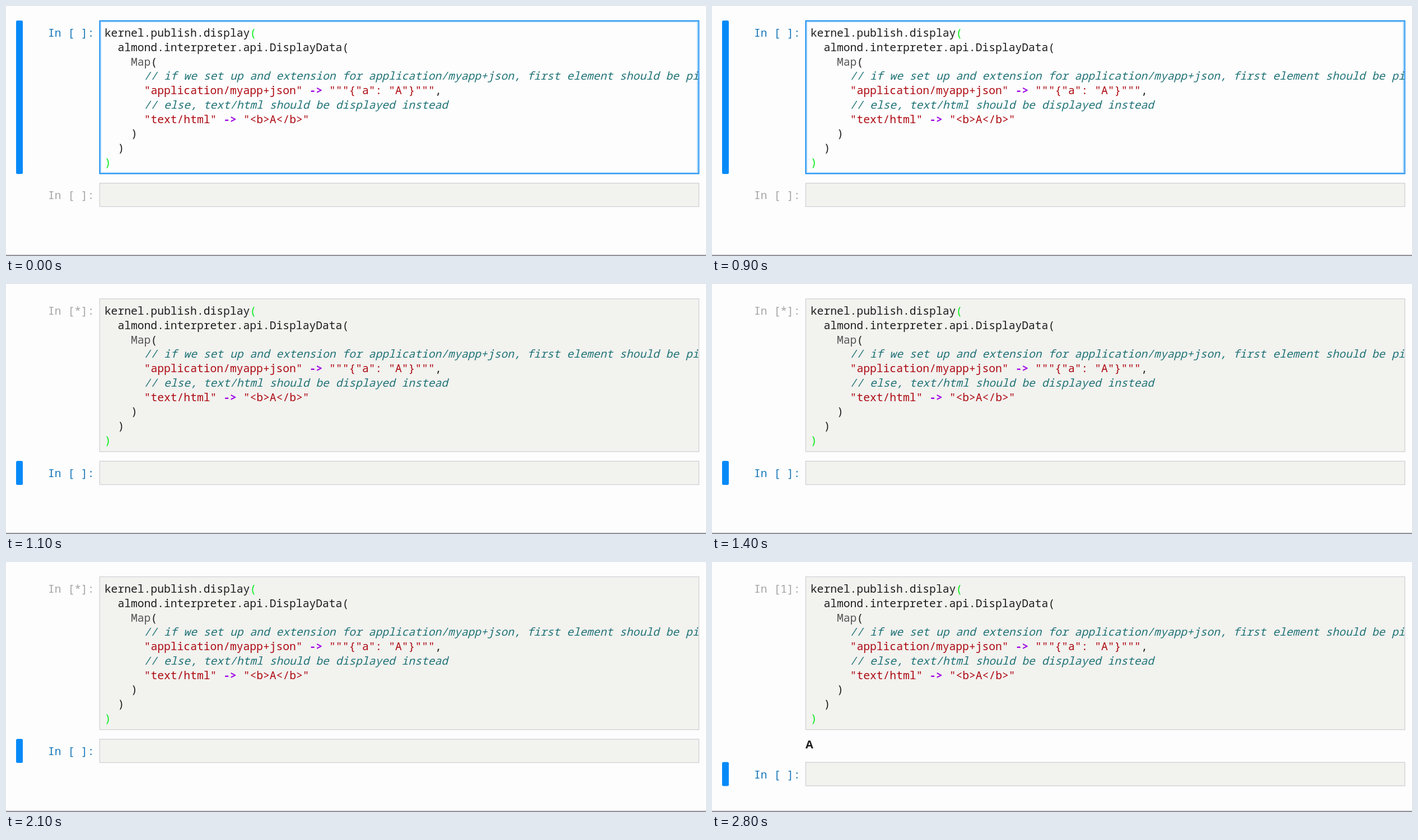
An HTML page with a canvas that plays this animation: 1250x448 px, repeating every 2900 ms.

```html
<!DOCTYPE html>
<html lang="en">
<head>
<meta charset="utf-8">
<title>Notebook cell run</title>
<style>
html, body { margin: 0; width: 100%; height: 100%; overflow: hidden; background: #fdfdfd; }
canvas { display: block; }
</style>
</head>
<body>
<canvas id="stage" width="1250" height="448"></canvas>
<script>
const ctx = document.getElementById('stage').getContext('2d');
const LOOP = 2900, RUN_AT = 1000, DONE_AT = 2200;
const SIZE = 19.67, COL = SIZE * 0.6, ROW = 25.75;
const MONO = `${SIZE}px "Noto Sans Mono", "DejaVu Sans Mono", monospace`;
const SANS = 'bold 20px "Noto Sans", "Open Sans", sans-serif';
const LEFT = 167, RIGHT = 1237;

const styles = {
  plain: ['#1c1c1c', ''],
  name: ['#555555', ''],
  match: ['#00ee16', ''],
  comment: ['#207377', 'italic '],
  string: ['#ad0a12', ''],
  op: ['#a000e4', 'bold ']
};

// Each line: indent, then pairs of style and text
const code = [
  [0, 'plain', 'kernel.publish.display', 'match', '('],
  [2, 'plain', 'almond.interpreter.api.DisplayData('],
  [4, 'name', 'Map', 'plain', '('],
  [6, 'comment', '// if we set up and extension for application/myapp+json, first element should be picked'],
  [6, 'string', '"application/myapp+json"', 'op', ' -> ', 'string', '"""{"a": "A"}"""', 'plain', ','],
  [6, 'comment', '// else, text/html should be displayed instead'],
  [6, 'string', '"text/html"', 'op', ' -> ', 'string', '"<b>A</b>"'],
  [4, 'plain', ')'],
  [2, 'plain', ')'],
  [0, 'match', ')']
];

function text(str, x, y, color, font = MONO) {
  ctx.font = font;
  ctx.fillStyle = color;
  ctx.fillText(str, x, y);
}

function drawCode() {
  ctx.save();
  ctx.beginPath();
  ctx.rect(LEFT, 26, RIGHT - LEFT, 275);
  ctx.clip();
  code.forEach(([indent, ...runs], row) => {
    let col = indent;
    for (let i = 0; i < runs.length; i += 2) {
      const [color, variant] = styles[runs[i]];
      text(runs[i + 1], 175.8 + col * COL, 55 + row * ROW, color, variant + MONO);
      col += runs[i + 1].length;
    }
  });
  ctx.restore();
}

function drawFrame(y, h, editing) {
  const w = RIGHT - LEFT;
  ctx.fillStyle = editing ? '#fdfdfd' : '#f2f2ef';
  ctx.fillRect(LEFT, y, w, h);
  if (editing) {
    ctx.lineWidth = 1;
    ['#80c2fa', '#c2e1fb', '#e6f3fc'].forEach((color, i) => {
      ctx.strokeStyle = color;
      ctx.strokeRect(LEFT + 1.5 + i, y + 1.5 + i, w - 3 - 2 * i, h - 3 - 2 * i);
    });
  }
  ctx.strokeStyle = editing ? '#0c88ee' : '#cfcfd4';
  ctx.lineWidth = editing ? 1.6 : 1.2;
  ctx.strokeRect(LEFT + 0.3, y + 0.5, w, h - 1);
}

function drawCell(y, h, mark, active, editing) {
  if (active) {
    ctx.fillStyle = '#078af8';
    ctx.beginPath();
    ctx.roundRect(18, y, 12, h, 2.5);
    ctx.fill();
  }
  drawFrame(y, h, editing);
  text(`In [${mark}]:`, 75, y + 29, active ? '#1576b8' : '#a4a4a4');
}

function draw(t) {
  const running = t >= RUN_AT, done = t >= DONE_AT;
  ctx.fillStyle = '#fdfdfd';
  ctx.fillRect(0, 0, 1250, 448);
  drawCell(26, 275, done ? '1' : running ? '*' : ' ', !running, !running);
  drawCode();
  if (done) text('A', LEFT, 333.5, '#1c1c1c', SANS);
  drawCell(done ? 358.5 : 317, 43, ' ', running, false);
  ctx.fillStyle = '#74747f';
  ctx.fillRect(0, 446, 1250, 1.6);
}

const start = performance.now();
function tick(now) {
  draw(Math.max(0, now - start) % LOOP);
  requestAnimationFrame(tick);
}
draw(0);
requestAnimationFrame(tick);
</script>
</body>
</html>
```
